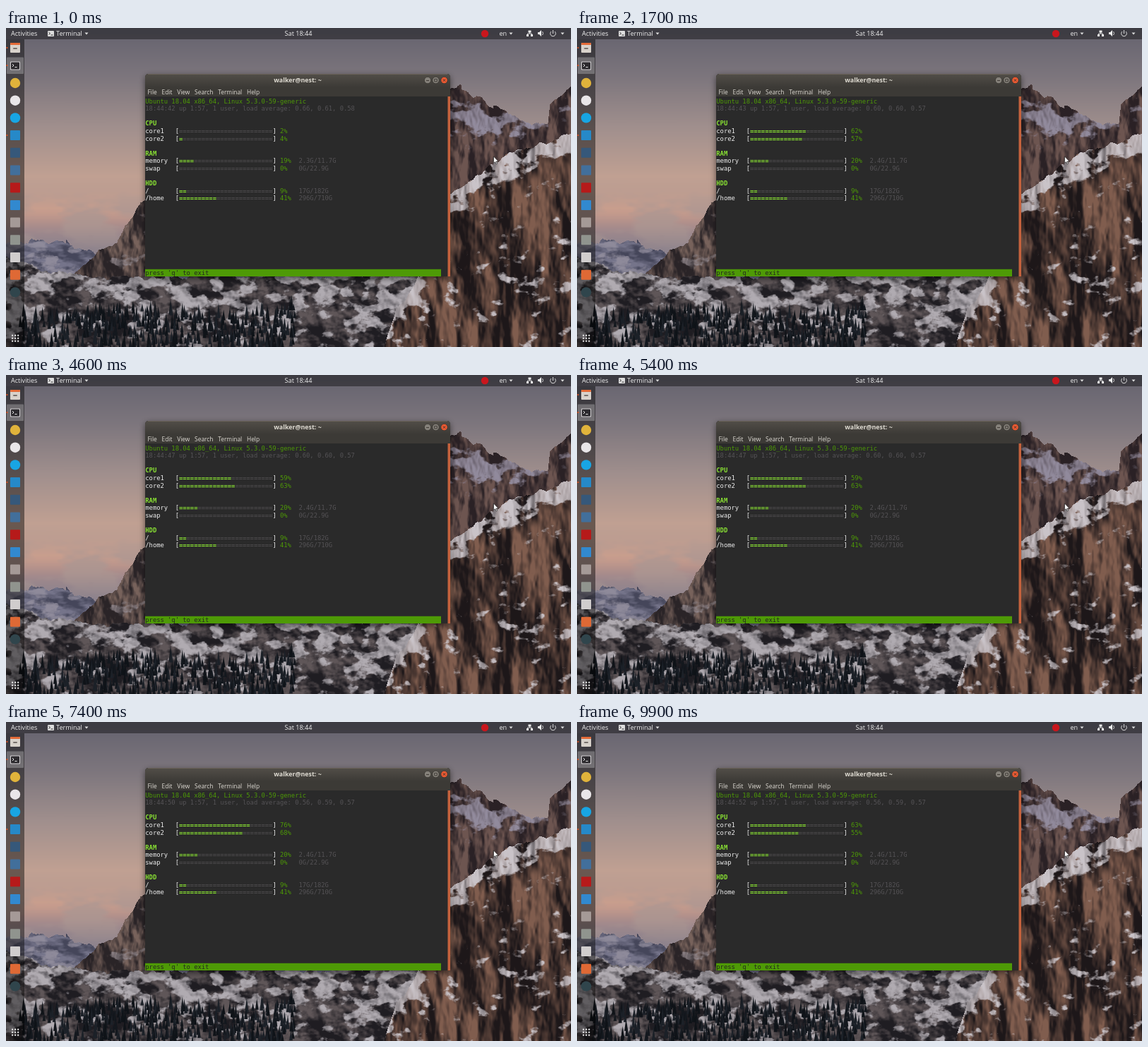
Recreate the animation shown at these times as an HTML page with a canvas. Size 800 by 452 pixels, loop 10 s.

```html
<!DOCTYPE html>
<html lang="en">
<head>
<meta charset="utf-8">
<title>System monitor</title>
<style>
html, body { margin: 0; width: 100%; height: 100%; overflow: hidden; background: #333; }
canvas, svg { position: absolute; left: 0; top: 0; width: 800px; height: 452px; }
svg text { font: 500 9.1px "Open Sans", sans-serif; fill: #eee; }
svg .menu { font-size: 8.4px; fill: #dedbd4; word-spacing: 4.6px; }
svg .title { font-size: 8.9px; font-weight: 700; fill: #dfdbd2; }
pre { position: absolute; left: 197.3px; top: 98.7px; margin: 0; color: #eee;
  font: 8.8px/10.6px "DejaVu Sans Mono", monospace; }
pre b { color: #8ae234; }
.green { color: #4e9a06; }
.dim { color: #555356; }
.foot { color: #232a1d; }
</style>
</head>
<body>
<canvas id="photo" width="800" height="452"></canvas>
<svg viewBox="0 0 800 452">
  <defs>
    <linearGradient id="bar" x2="0" y2="1">
      <stop stop-color="#524e48"/><stop offset="1" stop-color="#3c3a36"/>
    </linearGradient>
    <filter id="shadow" x="-10%" y="-10%" width="120%" height="125%">
      <feDropShadow dx="0" dy="3" stdDeviation="5" flood-opacity=".55"/>
    </filter>
  </defs>

  <rect width="800" height="16" fill-opacity=".4"/>
  <rect y="16" width="26" height="436" fill-opacity=".45"/>
  <text x="7" y="11.2">Activities</text>
  <rect x="59" y="4" width="9" height="8" rx="1" fill="#ddd"/>
  <path d="M60.5 6l2 1.7-2 1.7M63.5 10h3" fill="none" stroke="#333"/>
  <text x="71" y="11.2">Terminal</text>
  <text x="414" y="11.2" text-anchor="middle">Sat 18:44</text>
  <circle cx="678" cy="8" r="5.2" fill="#c9161d"/>
  <text x="698.5" y="11.2">en</text>
  <path d="M111.5 6.5h5l-2.5 3zM712.5 6.5h5l-2.5 3zM785.5 6.5h5l-2.5 3z" fill="#ddd"/>
  <path d="M739.5 3.5h4v3h-4zM737 9h3v3h-3zM743 9h3v3h-3zM753 6h2l3-3v9l-3-3h-2z" fill="#eee"/>
  <path d="M741.5 6v2M738.5 9.5v-1.5h6v1.5M759.5 5q2 2.5 0 5M772 5a3.8 3.8 0 1 0 5 0M774.5 3v5"
    fill="none" stroke="#ddd"/>

  <g id="dock"></g>

  <path d="M197 352V70q0-5 5-5h422q5 0 5 5v282z" fill="#2b292c" filter="url(#shadow)"/>
  <path d="M197 84V70q0-5 5-5h422q5 0 5 5v14z" fill="url(#bar)"/>
  <path d="M201 65.5h424" stroke="#696259"/>
  <rect x="197" y="84" width="432" height="13" fill="#3c3a36"/>
  <text class="title" x="413" y="77.3" text-anchor="middle">walker@nest: ~</text>
  <g fill="#85817a" stroke="#34312d" stroke-width=".7">
    <circle cx="597" cy="74" r="4.7"/>
    <circle cx="608.5" cy="74" r="4.7"/>
    <circle cx="620.5" cy="74" r="4.7" fill="#ed5a32"/>
  </g>
  <path d="M595 74.5h4M606.7 72.3h3.6v3.6h-3.6zM618.8 72.3l3.4 3.4M622.2 72.3l-3.4 3.4"
    fill="none" stroke="#38342f" stroke-width=".9"/>
  <text class="menu" x="200.5" y="93.5">File Edit View Search Terminal Help</text>
  <rect x="197" y="341.8" width="419" height="10.2" fill="#4e9a06"/>
  <rect x="625.5" y="97" width="3.5" height="255" fill="#c5623d"/>
  <path d="M690.5 182v9.5l2.2-2 1.5 3.3 1.4-.6-1.5-3.2h3z" fill="#fff" stroke="#111" stroke-width=".6"/>
</svg>
<pre id="screen"></pre>

<script>
const W = 800, H = 452;
const ctx = document.getElementById('photo').getContext('2d');
const image = ctx.createImageData(W, H);

let seed = 7;
const rand = () => (seed = (seed * 16807) % 2147483647) / 2147483647;
const clamp = v => Math.max(0, Math.min(1, v));
const rgb = hex => [1, 3, 5].map(i => parseInt(hex.slice(i, i + 2), 16));
const mix = (a, b, t) => a.map((v, i) => v + (b[i] - v) * t);

// Smooth value noise on a random lattice, then four octaves of it.
const lattice = Array.from({ length: 65536 }, rand);
const cell = (x, y) => lattice[(x & 255) + (y & 255) * 256];
function noise(x, y) {
  const i = Math.floor(x), j = Math.floor(y), ease = t => t * t * (3 - 2 * t);
  const u = ease(x - i), v = ease(y - j);
  const row = k => cell(i, k) * (1 - u) + cell(i + 1, k) * u;
  return row(j) * (1 - v) + row(j + 1) * v;
}
function fractal(x, y) {
  let sum = 0;
  for (let k = 1; k <= 8; k *= 2) sum += noise(x * k, y * k) / k;
  return sum / 1.875;
}

function put(x, y, color) {
  image.data.set([...color, 255], (y * W + x) * 4);
}

function sky() {
  const stops = ['#64626e', '#7d767d', '#a08f8d', '#c0a092', '#ab9490', '#74758a', '#74758a'].map(rgb);
  const peach = rgb('#d0a08c'), grey = rgb('#82788a');
  for (let y = 0; y < H; y++) {
    const band = Math.min(y / 70, 5.9), i = Math.floor(band);
    const base = mix(stops[i], stops[i + 1], band - i);
    const cloud = mix(peach, grey, clamp((y - 255) / 50));
    const haze = Math.exp(-(((y - 272) / 30) ** 2));
    for (let x = 0; x < W; x++) {
      const cover = x < 200 ? clamp((fractal(x / 60, y / 25) - 0.42) * 5) * haze : 0;
      put(x, y, cover ? mix(base, cloud, cover) : base);
    }
  }
}

// Everything below a rough crest line: shaded rock, and snow where snow(x, y, depth) is high.
function land(crest, [dark, light, white], [sx, sy], snow) {
  const [shade, lit, cap] = [dark, light, white].map(rgb);
  for (let k = 1; k < crest.length; k++) {
    const [x0, y0] = crest[k - 1], [x1, y1] = crest[k];
    for (let x = x0; x < x1; x++) {
      const top = Math.round(y0 + (y1 - y0) * (x - x0) / (x1 - x0) + (fractal(x / 12, y0) - 0.5) * 14);
      for (let y = Math.max(0, top); y < H; y++) {
        const r = fractal(x / sx, y / sy), facing = r - fractal((x + 3) / sx, (y - 3) / sy);
        const rock = mix(shade, lit, clamp(0.4 + (r - 0.5) * 2 + facing * 3));
        const drift = (fractal((x - y) / 22, (x + y * 2) / 30) - 0.5) * 9;
        const cover = clamp(drift + snow(x, y, y - top));
        put(x, y, mix(rock, cap, cover * clamp(0.85 + facing * 2)));
      }
    }
  }
}

function trees(count) {
  for (let i = 0; i < count; i++) {
    const x = 20 + rand() * 390, h = 7 + rand() * 12;
    const y = 402 + i / count * 60 + Math.sin(x / 38) * 6;
    ctx.fillStyle = ['#14181e', '#1c2128', '#0f1318'][i % 3];
    ctx.beginPath();
    ctx.moveTo(x, y - h);
    ctx.lineTo(x + 2.4, y + 3);
    ctx.lineTo(x - 2.4, y + 3);
    ctx.fill();
  }
}

function landscape() {
  sky();
  land([[0, 302], [85, 303], [130, 322], [200, 330]], ['#45465a', '#75748a', '#8e8a9a'], [30, 14], () => 0.3);
  land([[95, 350], [133, 314], [158, 302], [190, 248], [230, 235]],
    ['#2a2427', '#77625b', '#8e858a'], [14, 34], () => -1);
  land([[620, 92], [645, 84], [690, 111], [740, 133], [767, 134], [770, 108], [800, 80]],
    ['#2a2125', '#6d5550', '#918a9c'], [14, 40], (x, y) => x < 768 ? 1.7 - Math.abs(y - 132) / 10 : -1);
  land([[0, 328], [60, 345], [110, 352], [640, 350]],
    ['#1f1d22', '#5f5658', '#b0abb1'], [22, 18], (x, y) => 0.5 - Math.max(0, y - 385) / 45);
  land([[535, 452], [552, 400], [585, 352], [625, 237], [690, 192], [720, 177], [800, 148]],
    ['#1d1719', '#805d4e', '#c9c3c8'], [20, 62], (x, y, depth) => Math.max(-1.3, 1.9 - depth / 13));
  ctx.putImageData(image, 0, 0);
  trees(520);
}

function dock() {
  const square = (x, y, w, h, fill) => `<rect x="${x}" y="${y}" width="${w}" height="${h}" rx="1" fill="${fill}"/>`;
  const disc = (x, y, r, fill) => `<circle cx="${x}" cy="${y}" r="${r}" fill="${fill}"/>`;
  let art = square(1, 41.5, 24, 23.5, '#ffffff40') +
    square(6, 21, 14, 14, '#d8d2cb') + square(6, 21, 14, 3, '#e46b38') + square(10, 28, 6, 2, '#78716d') +
    square(6, 47.5, 14, 12, '#d0cdd0') + square(7, 48.5, 12, 10, '#2c2a2e') +
    '<path d="M9 51l2 2-2 2M12.5 55.5h3" fill="none" stroke="#eee"/>';
  const round = ['#e0b33b', '#e9e6e8', '#18a5e3'];
  const flat = ['#2689c8', '#36587a', '#426f9b', '#b61a1a', '#3289cf', '#a59a97', '#90948e', '#d0cdcd', '#df6935'];
  [...round, ...flat, '#30454c'].forEach((fill, i) => {
    const y = 78 + i * 24.7;
    art += flat.includes(fill) ? square(6, y - 7, 14, 14, fill) : disc(13, y, 7.2, fill);
  });
  for (let i = 0; i < 9; i++) art += square(8 + i % 3 * 4, 434.5 + Math.floor(i / 3) * 4, 2.3, 2.3, '#eee');
  for (const y of [28, 53, 152]) art += disc(1.5, y, 1.1, '#e95420');
  document.getElementById('dock').innerHTML = art;
}

const core1 = [2, 62, 60, 59, 62, 76, 63];
const core2 = [4, 57, 58, 63, 56, 68, 55];
const loads = ['0.66, 0.61, 0.58', '0.60, 0.60, 0.57', '0.56, 0.59, 0.57'];
const paint = (name, text) => `<span class="${name}">${text}</span>`;

function meter(label, percent, note = '') {
  const full = Math.floor(percent / 4);
  return label.padEnd(8) + '[<b>' + '='.repeat(full) + '</b>' + paint('dim', '='.repeat(25 - full)) + '] ' +
    paint('green', (percent + '%').padEnd(5)) + paint('dim', note);
}

// The monitor refreshes three times in five seconds.
function monitor(index) {
  const second = Math.floor(42 + index * 5 / 3);
  return [
    paint('green', 'Ubuntu 18.04 x86_64, Linux 5.3.0-59-generic'),
    paint('dim', `18:44:${second} up 1:57, 1 user, load average: ${loads[Math.ceil(index / 3)] || loads[2]}`),
    '', '<b>CPU</b>', meter('core1', core1[index]), meter('core2', core2[index]),
    '', '<b>RAM</b>',
    index ? meter('memory', 20, '2.4G/11.7G') : meter('memory', 19, '2.3G/11.7G'),
    meter('swap', 0, '0G/22.9G'),
    '', '<b>HDD</b>', meter('/', 9, '17G/182G'), meter('/home', 41, '296G/710G'),
    ...Array(9).fill(''), paint('foot', "press 'q' to exit")
  ].join('\n');
}

const screenBox = document.getElementById('screen');
const start = performance.now();
let shown = -1;
function tick() {
  const time = (performance.now() - start) % 10000;
  const index = Math.floor((time + 1250) * 3 / 5000);
  if (index !== shown) screenBox.innerHTML = monitor(shown = index);
  requestAnimationFrame(tick);
}

landscape();
dock();
tick();
</script>
</body>
</html>
```
